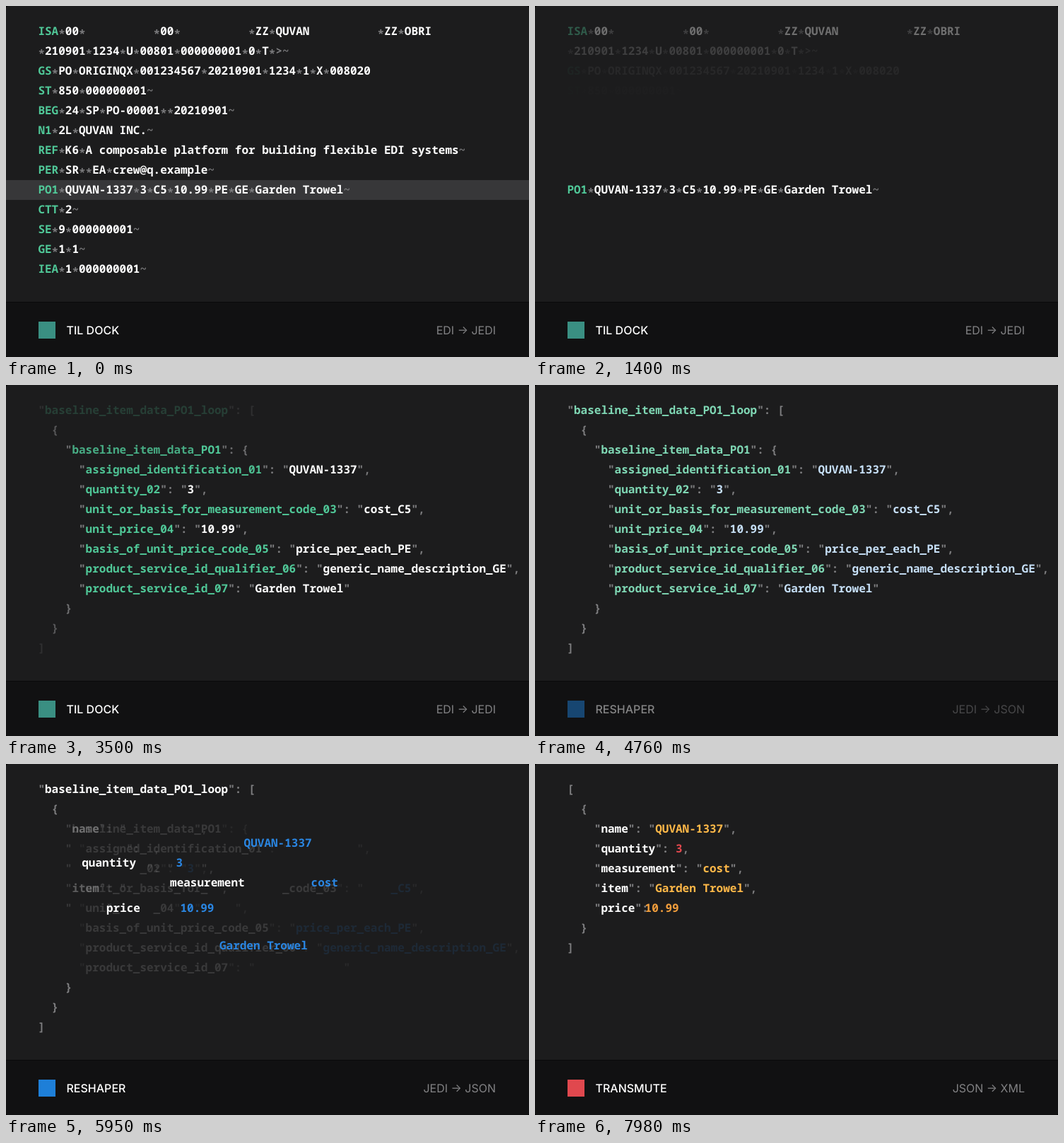
An HTML page that plays this animation: 740x496 px, repeating every 8 s.

```html
<!DOCTYPE html>
<html lang="en">
<head>
<meta charset="utf-8">
<title>Document to data</title>
<style>
  html, body { margin: 0; width: 100%; height: 100%; overflow: hidden; background: #000; }
  svg { display: block; width: 740px; height: 496px; text-rendering: geometricPrecision; }
  .code text { font: 600 16px "Noto Sans Mono", "DejaVu Sans Mono", monospace; white-space: pre; }
  .foot text { font: 500 16px Inter, "Liberation Sans", sans-serif; fill: #fff; }
  .foot .route { font-weight: 400; fill: #828284; text-anchor: end; }
</style>
</head>
<body>
<svg viewBox="0 0 740 496">
  <rect width="740" height="496" rx="4" fill="#1c1c1d"/>
  <rect id="bar" y="246" width="740" height="28" fill="#373739"/>
  <path d="M0 418H740V492a4 4 0 0 1-4 4H4a4 4 0 0 1-4-4Z" fill="#111112"/>
  <rect y="418" width="740" height="1" fill="#0a0a0b"/>
  <g class="code" id="code"></g>
  <g class="foot" id="foot"></g>
</svg>
<script>
const LOOP = 8000, DUR = 640, STEP = 100;
const X0 = 45.4, Y0 = 41, CW = 9.6, LH = 28;
const T = {
  clear: 57, fly: 2037, build: 2565, tint: 4712,
  strip: 5692, remap: 5900, rootOut: 6290, fold: 6450, retint: 7300, mark: 7908
};

const GREEN = [80, 200, 152], WHITE = [255, 255, 255], GRAY = [125, 125, 127];
const BLUE = [42, 134, 226], AMBER = [255, 184, 72], RED = [226, 72, 78], ORANGE = [242, 158, 60];

// each kind lists its colours and when each change begins
const KINDS = {
  gray: [[0, GRAY]],
  plain: [[0, WHITE]],
  head: [[0, GREEN]],
  key: [[0, GREEN], [T.tint, WHITE]],
  val: [[0, WHITE], [T.tint, BLUE], [T.retint, AMBER]],
  int: [[0, WHITE], [T.tint, BLUE], [T.retint, RED]],
  dec: [[0, WHITE], [T.tint, BLUE], [T.retint, ORANGE]]
};

const NS = "http://www.w3.org/2000/svg";
const $ = id => document.getElementById(id);
function add(parent, tag, attrs, text) {
  const el = document.createElementNS(NS, tag);
  for (const k in attrs) el.setAttribute(k, attrs[k]);
  if (text) el.textContent = text;
  parent.appendChild(el);
  return el;
}

// quartic ease-out from a start time
function ramp(t, start) {
  const p = Math.min(1, Math.max(0, (t - start) / DUR));
  return 1 - (1 - p) ** 4;
}

// follow a list of [start, ...values], easing into each entry
function follow(stops, t) {
  let now = stops[0].slice(1);
  for (const [start, ...next] of stops.slice(1)) {
    const p = ramp(t, start);
    now = now.map((v, i) => v + (next[i] - v) * p);
  }
  return now;
}

const items = [];
function item(str, kind, stops, fadeIn = -DUR, fadeOut = 2 * LOOP) {
  const el = add($("code"), "text", {}, str);
  const low = /^\*+$/.test(str) ? 3.5 : 0;
  items.push({ el, stops, low, fadeIn, fadeOut, tint: KINDS[kind].map(([s, c]) => [s, ...c]) });
}

// segment rows
const segments = [
  "ISA*00*          *00*          *ZZ*QUVAN          *ZZ*OBRI",
  "*210901*1234*U*00801*000000001*0*T*>~",
  "GS*PO*ORIGINQX*001234567*20210901*1234*1*X*008020",
  "ST*850*000000001~",
  "BEG*24*SP*PO-00001**20210901~",
  "N1*2L*QUVAN INC.~",
  "REF*K6*A composable platform for building flexible EDI systems~",
  "PER*SR**EA*crew@q.example~",
  "   *          * *  *     *  *  *             ~",
  "CTT*2~",
  "SE*9*000000001~",
  "GE*1*1~",
  "IEA*1*000000001~"
];
segments.forEach((line, r) => {
  const out = r === 8 ? T.fly - 30 : T.clear + STEP * (12 - r);
  for (const m of line.matchAll(/\*+|[~>]+|[^*~>]+/g)) {
    if (!m[0].trim()) continue;
    const kind = /[*~>]/.test(m[0]) ? "gray" : m.index ? "plain" : "head";
    item(m[0], kind, [[0, m.index, r]], -DUR, out);
  }
});

// structured rows; gaps are filled by travelling words
function structured(line, r, fadeIn, fadeOut) {
  const colon = line.indexOf(":");
  for (const m of line.matchAll(/["{}\[\]:,]+|[^\s"{}\[\]:,]+/g)) {
    const kind = /["{}\[\]:,]/.test(m[0]) ? "gray" : m.index < colon ? "key" : "val";
    item(m[0], kind, [[0, m.index, r]], fadeIn, fadeOut);
  }
}
// fields build from the bottom up, closing brackets then go down
const showAt = r => T.build + STEP * (r < 10 ? 9 - r : r - 3);
const gap = n => " ".repeat(n);
const field = (key, value) => `${gap(6)}"${key}": "${value}"`;
[
  '"baseline_item_data_PO1_loop":',
  "  {",
  `    "baseline_item_data_${gap(3)}": {`,
  field("assigned_identification_01", gap(10)) + ",",
  field(gap(8) + "_02", " ") + ",",
  field(`unit_or_basis_for_${gap(11)}_code_03`, gap(4) + "_" + gap(2)) + ",",
  field(`unit_${gap(5)}_04`, gap(5)) + ",",
  field("basis_of_unit_price_code_05", "price_per_each_" + gap(2)) + ",",
  field("product_service_id_qualifier_06", "generic_name_description_" + gap(2)) + ",",
  field("product_service_id_07", gap(13)),
  "    }"
].forEach((line, r) => {
  const out = r === 0 ? T.rootOut : r === 1 ? undefined : r === 10 ? T.fold : T.strip;
  structured(line, r, showAt(r), out);
});

[
  `    "name": "${gap(10)}",`,
  `    "${gap(8)}":  ,`,
  `    "${gap(11)}": "${gap(4)}",`,
  `    "item": "${gap(13)}",`,
  `    "${gap(5)}":`
].forEach((line, i) => structured(line, i + 2, T.remap));

// brackets that close up
item("[", "gray", [[0, 31, 0], [T.fold, 0, 0]], showAt(0));
item("}", "gray", [[0, 2, 11], [T.fold, 2, 7]], showAt(11));
item("]", "gray", [[0, 0, 12], [T.fold, 0, 8]], showAt(12));

// words leaving the segment row, last one first
const flight = i => T.fly + STEP * i;
item("PO1", "key", [[0, 0, 8], [flight(7), 24, 2]], -DUR, T.strip);
item("QUVAN-1337", "val", [[0, 4, 8], [flight(6), 37, 3], [T.remap, 13, 2]]);
item("3", "int", [[0, 15, 8], [flight(5), 22, 4], [T.remap, 16, 3]]);
item("C5", "val", [[0, 17, 8], [flight(4), 53, 5]], -DUR, T.strip);
item("10.99", "dec", [[0, 20, 8], [flight(3), 24, 6], [T.remap, 13, 6], [T.mark, 9, 6]]);
item("PE", "val", [[0, 26, 8], [flight(2), 53, 7]], -DUR, T.strip);
item("GE", "val", [[0, 29, 8], [flight(1), 67, 8]], -DUR, T.strip);
item("Garden Trowel", "val", [[0, 32, 8], [flight(0), 32, 9], [T.remap, 13, 5]]);
item("3", "val", [[0, 22, 4]], T.tint, T.strip); // stays behind when the count moves on

// words that appear with a field and are kept by the mapping
item("quantity", "key", [[0, 7, 4], [T.remap, 5, 3]], showAt(4));
item("measurement", "key", [[0, 25, 5], [T.remap, 5, 4]], showAt(5));
item("cost", "val", [[0, 48, 5], [T.remap, 20, 4]], showAt(5));
item("price", "key", [[0, 12, 6], [T.remap, 5, 6]], showAt(6));

const footers = [
  ["TIL DOCK", "EDI → JEDI", "#3a8f82", -DUR, 4130],
  ["RESHAPER", "JEDI → JSON", "#1e7fd8", 4663, 6490],
  ["TRANSMUTE", "JSON → XML", "#e0484e", 7050, 2 * LOOP]
].map(([name, route, color, fadeIn, fadeOut]) => {
  const el = add($("foot"), "g", {});
  add(el, "rect", { x: 46, y: 446, width: 24, height: 24, fill: color });
  add(el, "text", { x: 85.5, y: 463.5 }, name);
  add(el, "text", { x: 693, y: 463.5, class: "route" }, route);
  return { el, fadeIn, fadeOut };
});

function fade(o, t) {
  const a = ramp(t, o.fadeIn) * (1 - ramp(t, o.fadeOut));
  o.el.setAttribute("opacity", a.toFixed(3));
  return a;
}

function draw(t) {
  $("bar").setAttribute("opacity", 1 - ramp(t, T.clear));
  for (const o of items) {
    if (!fade(o, t)) continue;
    const [col, row] = follow(o.stops, t);
    o.el.setAttribute("x", (X0 + col * CW).toFixed(2));
    o.el.setAttribute("y", (Y0 + row * LH + o.low).toFixed(2));
    o.el.setAttribute("fill", `rgb(${follow(o.tint, t).map(Math.round)})`);
  }
  for (const f of footers) fade(f, t);
}

let begin;
function tick(now) {
  begin ??= now;
  draw((now - begin) % LOOP);
  requestAnimationFrame(tick);
}
draw(0);
requestAnimationFrame(tick);
</script>
</body>
</html>
```
